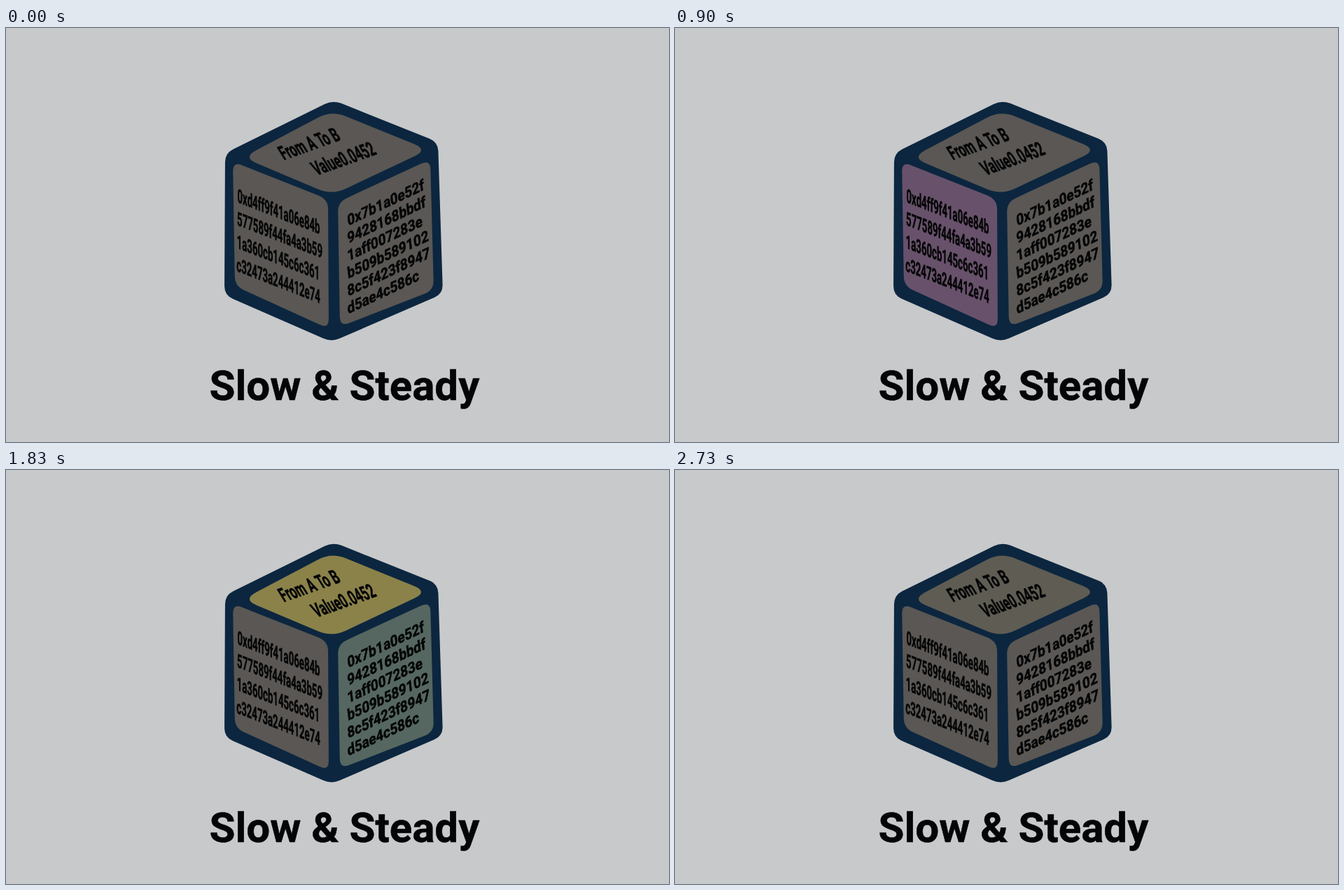
Animation of 947x592 px, one loop 2.96 s. Source, as an HTML page:

```html
<!DOCTYPE html>
<html lang="en">
<head>
<meta charset="utf-8">
<title>Slow &amp; Steady</title>
<style>
html, body { margin: 0; width: 100%; height: 100%; overflow: hidden; background: #c8c9cb; }
svg { display: block; }
text { font: bold 60px Roboto, sans-serif; fill: #040506; stroke: #040506; stroke-width: 0.5px; white-space: pre; }
</style>
</head>
<body>
<svg id="stage" width="947" height="592" viewBox="0 0 947 592">
  <text x="290.5" y="532">Slow &amp; Steady</text>
</svg>
<script>
const LOOP = 2960;
const GREY = [90, 87, 84];
const stage = document.getElementById("stage");

function add(tag, attrs) {
  const el = document.createElementNS(stage.namespaceURI, tag);
  for (const name in attrs) el.setAttribute(name, attrs[name]);
  stage.append(el);
  return el;
}

// Polygon whose corners are rounded from a distance r on either side.
function panel(corners, r, fill) {
  const n = corners.length;
  const toward = ([x, y], [p, q]) => {
    const k = r / Math.hypot(p - x, q - y);
    return [x + (p - x) * k, y + (q - y) * k];
  };
  const d = corners.map((c, i) =>
    `${i ? "L" : "M"}${toward(c, corners[(i + n - 1) % n])}Q${c} ${toward(c, corners[(i + 1) % n])}`);
  return add("path", { d: d.join("") + "Z", fill });
}

// Lines of text on a slanted face: across is the baseline, down the letter height.
function write(lines, size, across, down, [x, y], [dx, dy]) {
  lines.forEach((line, i) => {
    const matrix = [...across, ...down, x + i * dx, y + i * dy];
    add("text", { transform: `matrix(${matrix})`, style: `font-size:${size}px` }).textContent = line;
  });
}

panel([[467, 103], [617, 163], [624, 380], [465, 449], [312, 382], [313, 179]], 13, "#0c263f");

const faces = [
  { el: panel([[324, 191], [460, 245], [461, 430], [327, 369]], 14),
    tint: [27, -12, 45], starts: [130, 630], fade: 320, tick: 112 },
  { el: panel([[474, 249], [606, 188], [611, 375], [477, 427]], 14),
    tint: [-10, 31, 24], starts: [1160, 1560], fade: 320, tick: 112 },
  { el: panel([[465, 118], [603, 174], [466, 239], [338, 185]], 22),
    tint: [49, 43, -10], starts: [1830], fade: 1060, tick: 200 }
];

write(["0xd4ff9f41a06e84b", "577589f44fa4a3b59", "1a360cb145c6c361", "c32473a244412e74"],
  27, [0.489, 0.19], [0, 1], [330.5, 249], [-0.4, 32.8]);
write(["0x7b1a0e52f", "9428168bbdf", "1aff007283e", "b509b589102", "8c5f423f8947", "d5ae4c586c"],
  21.5, [0.856, -0.406], [0.12, 1], [488.5, 283], [0, 25.2]);
write(["From A To B", "Value0.0452"],
  24, [0.635, -0.225], [0.65, 1.05], [397, 189], [47, 22]);

// A flash starts at full strength and fades in ticks.
function level({ starts, fade, tick }, time) {
  const ages = starts.map(s => time - s).filter(age => age >= 0);
  if (!ages.length) return 0;
  const age = Math.round(Math.min(...ages) / tick) * tick;
  return Math.max(0, 1 - (age / fade) ** 2);
}

function draw(now) {
  const time = now % LOOP;
  // The picture stands still for a while once the top lights up.
  const clock = time >= 1830 && time < 2400 ? 1830 : time;
  for (const face of faces) {
    const k = level(face, clock);
    face.el.setAttribute("fill", `rgb(${GREY.map((c, i) => Math.round(c + k * face.tint[i]))})`);
  }
}

const start = performance.now();
function tick() {
  draw(performance.now() - start);
  requestAnimationFrame(tick);
}
tick();
</script>
</body>
</html>
```
